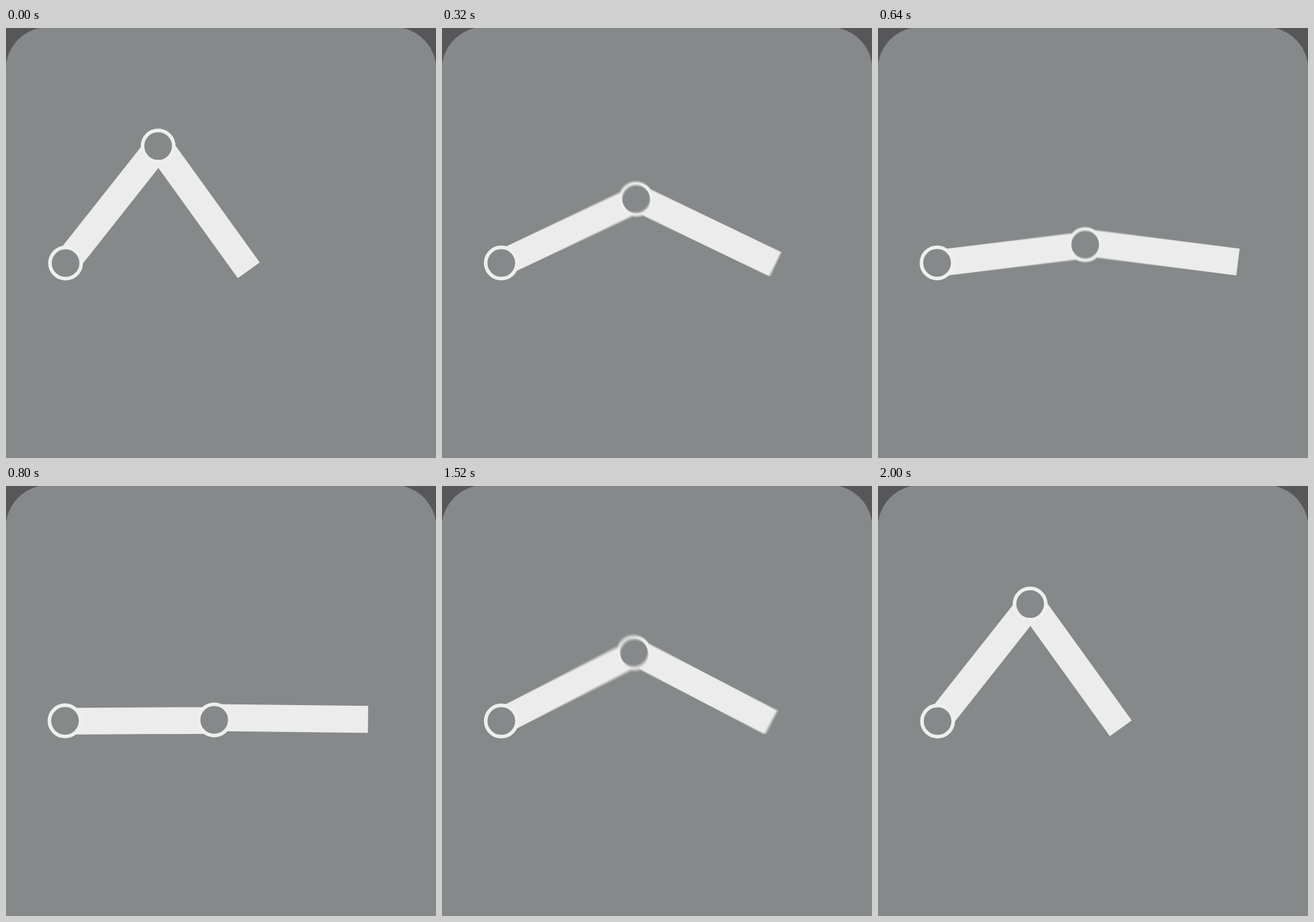
Recreate the animation shown at these times as an HTML page. Size 685x685 px, loop 2.8 s.

```html
<!DOCTYPE html>
<html lang="en">
<head>
<meta charset="utf-8">
<title>Folding arm</title>
<style>
  html, body { margin: 0; width: 100%; height: 100%; overflow: hidden; background: #575759; }
  svg { display: block; width: 100%; height: 100%; }
</style>
</head>
<body>
<svg id="stage" viewBox="0 0 685 685">
  <rect x="-0.5" y="-1.5" width="686" height="760" rx="68" fill="#868989"/>
</svg>
<script>
const NS = 'http://www.w3.org/2000/svg';
const stage = document.getElementById('stage');
const GREY = '#868989', LIGHT = '#ececec', RING = '#efefef';
const LOOP = 2800, STEP = 40, MOVE = 800, BACK = 1200;
const SAMPLES = 8, SHUTTER = 20;
const BENT = 51.66, FLAT = 0.35;

// Each knot: time, value, slope
const unfold = [[0, 0, 1.5], [0.2, 0.28, 1.3], [0.6, 0.705, 0.9], [1, 1, 0.55]];
const refold = [[0, 0, 0.95], [0.4, 0.522, 1.42], [0.7, 0.897, 0.9], [1, 1, 0]];

function hermite(knots, x) {
  if (x <= 0) return 0;
  if (x >= 1) return 1;
  const i = knots.findIndex(k => k[0] > x);
  const [x0, y0, m0] = knots[i - 1], [x1, y1, m1] = knots[i];
  const h = x1 - x0, s = (x - x0) / h, r = 1 - s;
  return y0 * (1 + 2 * s) * r * r + m0 * h * s * r * r
       + y1 * s * s * (3 - 2 * s) - m1 * h * s * s * r;
}

function add(parent, tag, attrs) {
  const el = document.createElementNS(NS, tag);
  for (const key in attrs) el.setAttribute(key, attrs[key]);
  return parent.appendChild(el);
}

// Opacity 1/(n+1) on stacked layers yields an even average of all poses.
function makeLayer(n) {
  const g = add(stage, 'g', { opacity: 1 / (n + 1) });
  add(g, 'rect', { x: 40, y: 130, width: 600, height: 300, fill: GREY });
  const bar = (length, y, height) =>
    add(g, 'rect', { width: length, y, height, fill: LIGHT });
  const ring = () =>
    add(g, 'circle', { r: 24.9, fill: GREY, stroke: RING, 'stroke-width': 5.7 });
  return {
    g,
    upper: bar(237.7, -20.5, 42.5),
    lower: bar(245, -21.5, 43),
    base: ring(),
    joint: ring()
  };
}

const layers = Array.from({ length: SAMPLES }, (_, n) => makeLayer(n));

function pose(layer, angle) {
  const k = angle / BENT, rad = angle * Math.PI / 180;
  const bx = 94 + 0.9 * k, by = 374.1 + 0.4 * k;
  const jx = bx + 237.7 * Math.cos(rad), jy = by - 237.7 * Math.sin(rad);
  const tilt = angle + 0.25 + 2.3 * k ** 5;
  const shift = 2.2 * k - 3.6;
  layer.upper.setAttribute('transform', `translate(${bx} ${by}) rotate(${-angle})`);
  layer.lower.setAttribute('transform',
    `translate(${jx} ${jy}) rotate(${tilt}) translate(0 ${shift})`);
  layer.base.setAttribute('transform', `translate(${bx} ${by})`);
  layer.joint.setAttribute('transform', `translate(${jx} ${jy})`);
}

function angleAt(t) {
  const open = t < BACK ? hermite(unfold, t / MOVE) : 1 - hermite(refold, (t - BACK) / MOVE);
  return BENT + (FLAT - BENT) * open;
}

function draw(ms) {
  const t = Math.floor((ms % LOOP) / STEP) * STEP;
  const moving = (t > 0 && t < MOVE) || (t > BACK && t < BACK + MOVE);
  layers.forEach((layer, n) => {
    const used = moving || n === 0;
    layer.g.setAttribute('display', used ? 'inline' : 'none');
    const offset = moving ? ((n + 0.5) / SAMPLES - 0.5) * SHUTTER : 0;
    if (used) pose(layer, angleAt(t + offset));
  });
}

const start = performance.now();
function tick() {
  draw(performance.now() - start);
  requestAnimationFrame(tick);
}
tick();
</script>
</body>
</html>
```
